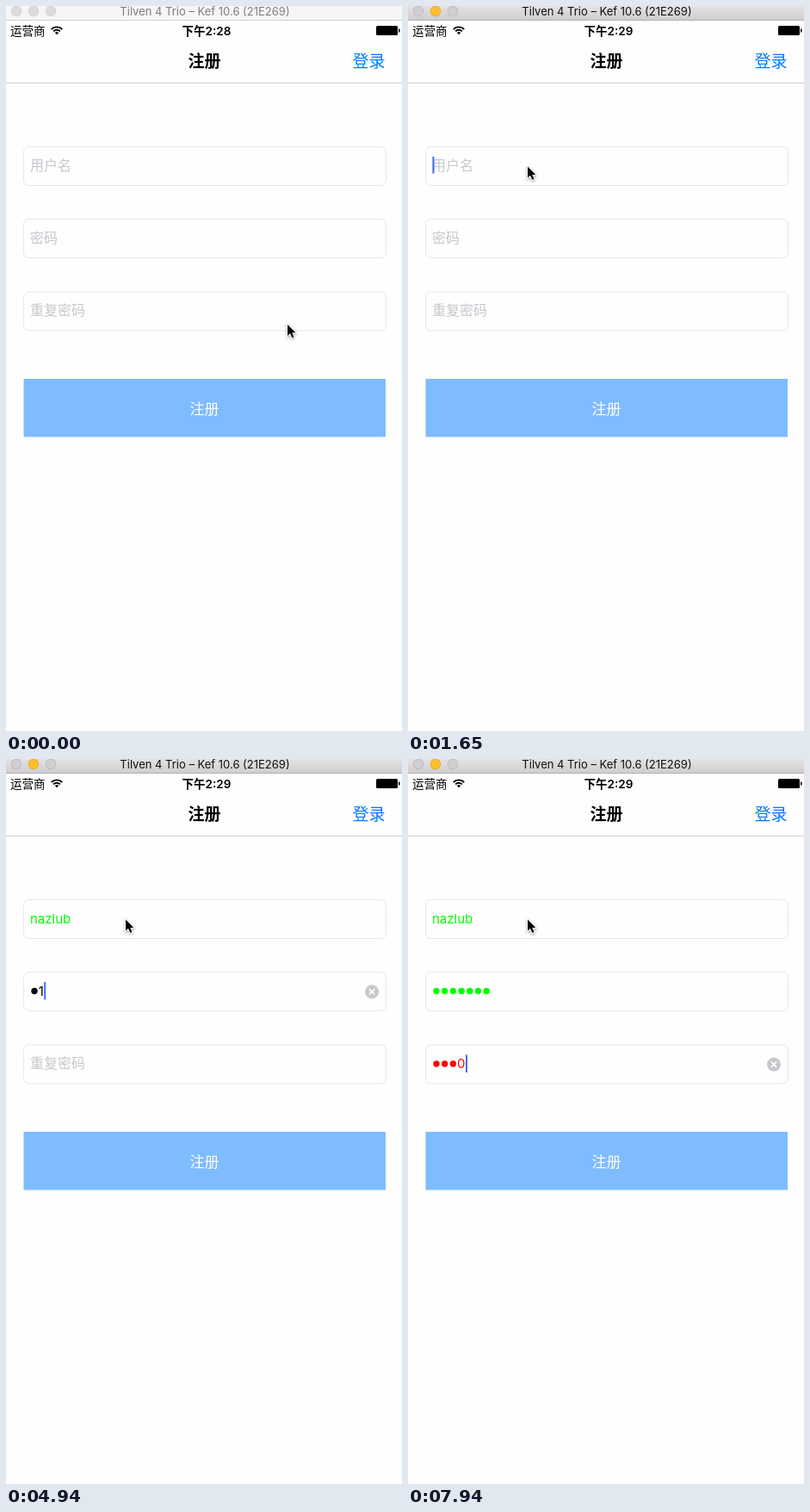
Recreate the animation shown at these times as an HTML page with a canvas. Size 460x842 px, loop 8000 ms.

```html
<!DOCTYPE html>
<html lang="zh">
<head>
<meta charset="utf-8">
<title>注册</title>
<style>
  html, body { margin: 0; width: 460px; height: 842px; overflow: hidden; background: #fefefe; }
  canvas { display: block; }
</style>
</head>
<body>
<canvas id="stage" width="460" height="842"></canvas>
<script>
const ctx = document.getElementById('stage').getContext('2d');
const LOOP = 8000;
const FONT = 'Inter, "Noto Sans CJK SC", "Noto Sans CJK", sans-serif';
const GREEN = '#00ff00', RED = '#ff0000', BLACK = '#000';
const TEXT_X = 28, DOT_PITCH = 9.7;

// Pointer tip: [start time, x, y]
const POINTER = [
  [0, 326.5, 369.5], [150, 326, 367], [300, 323, 352], [450, 318.5, 330.5],
  [600, 296, 312], [750, 250, 290], [900, 185, 266], [1050, 141, 253],
  [1200, 141, 193], [1500, 138.5, 186]
];

const FIELDS = [
  { y: 163.5, hint: '用户名', value: 'nazlub', focus: 1650, blur: 3590,
    keys: [2090, 2540, 2690, 3140, 3290, 3440],
    color: n => n < 6 ? RED : GREEN },
  { y: 247.5, hint: '密码', value: '2140367', secret: true, focus: 3740, blur: 6590,
    keys: [4340, 4940, 5240, 5390, 5540, 5690, 5840], maskAt: 6440,
    color: n => n < 6 ? BLACK : GREEN },
  { y: 332, hint: '重复密码', value: '2140367', secret: true, focus: 6740, blur: LOOP,
    keys: [7190, 7490, 7790, 7940],
    color: () => RED }
];

function text(str, x, y, size, color, align = 'left', weight = 400) {
  ctx.font = `${weight} ${size}px ${FONT}`;
  ctx.textAlign = align;
  ctx.fillStyle = color;
  ctx.fillText(str, x, y);
  return ctx.measureText(str).width;
}

function rect(x, y, w, h, color) {
  ctx.fillStyle = color;
  ctx.fillRect(x, y, w, h);
}

function disc(x, y, r, color) {
  ctx.fillStyle = color;
  ctx.beginPath();
  ctx.arc(x, y, r, 0, Math.PI * 2);
  ctx.fill();
}

function titleBar(active) {
  const shade = ctx.createLinearGradient(0, 0, 0, 16);
  shade.addColorStop(0, active ? '#e4e2e4' : '#f6f6f6');
  shade.addColorStop(1, active ? '#cfcdcf' : '#f6f6f6');
  rect(0, 0, 460, 16, shade);
  rect(0, 16, 460, 1, active ? '#b3b1b3' : '#d1d1d1');
  [12, 32, 52].forEach((x, i) => {
    const yellow = active && i === 1;
    disc(x, 6, 6.2, yellow ? '#e0a52c' : active ? '#bab8ba' : '#d2d2d2');
    disc(x, 6, 5.5, yellow ? '#ffbf2f' : active ? '#d0ced0' : '#dcdcdc');
  });
  text('Tilven 4 Trio – Kef 10.6 (21E269)', 231, 11, 13, active ? '#111' : '#7f7f7f', 'center');
}

function wifi() {
  const x = 59, y = 33.2, a = Math.PI * 0.25;
  ctx.strokeStyle = BLACK;
  ctx.lineWidth = 1.9;
  for (const r of [5.4, 8.8]) {
    ctx.beginPath();
    ctx.arc(x, y, r, -Math.PI + a, -a);
    ctx.stroke();
  }
  ctx.fillStyle = BLACK;
  ctx.beginPath();
  ctx.moveTo(x, y);
  ctx.arc(x, y, 3, -Math.PI + a, -a);
  ctx.fill();
}

function statusBar(clock) {
  text('运营商', 5, 33.5, 13.5, BLACK);
  wifi();
  text(clock, 233, 33.5, 13.5, BLACK, 'center', 600);
  ctx.fillStyle = BLACK;
  ctx.beginPath();
  ctx.roundRect(430, 23, 25, 11, 1.5);
  ctx.fill();
  rect(456, 26.5, 1.5, 4, BLACK);
}

function navBar() {
  text('注册', 230.5, 71.3, 19, BLACK, 'center', 600);
  text('登录', 440.5, 71.3, 19, '#007aff', 'right');
  rect(0, 89, 460, 1, '#cfcfcf');
}

function clearButton(y) {
  disc(425, y, 8, '#c7c7cc');
  ctx.strokeStyle = '#fff';
  ctx.lineWidth = 1.7;
  ctx.beginPath();
  for (const d of [-3.2, 3.2]) {
    ctx.moveTo(425 - 3.2, y - d);
    ctx.lineTo(425 + 3.2, y + d);
  }
  ctx.stroke();
}

function field(f, t) {
  ctx.strokeStyle = '#e6e6e6';
  ctx.lineWidth = 1;
  ctx.beginPath();
  ctx.roundRect(20.5, f.y, 421, 45, 6);
  ctx.stroke();

  const count = f.keys.filter(k => t >= k).length;
  const focused = t >= f.focus && t < f.blur;
  const baseline = f.y + 27.3;
  let caretX = TEXT_X;

  if (!count) {
    text(f.hint, TEXT_X, baseline, 16, '#c7c7cd');
  } else {
    const color = f.color(count);
    const hidden = !f.secret ? 0 : t >= f.maskAt ? count : count - 1;
    for (let i = 0; i < hidden; i++) {
      disc(33 + i * DOT_PITCH, f.y + 22, 3.7, color);
    }
    caretX += hidden * DOT_PITCH;
    caretX += text(f.value.slice(hidden, count), caretX, baseline, 15, color);
    if (focused) clearButton(f.y + 22.8);
  }
  if (focused) rect(caretX + 0.4, f.y + 11.5, 2, count ? 20.5 : 19.5, '#426bf2');
}

function pointer(t) {
  const [, x, y] = POINTER.findLast(p => t >= p[0]);
  ctx.save();
  ctx.translate(x, y);
  ctx.beginPath();
  [[0.5, 0.5], [0.5, 13.5], [3.5, 10.8], [5.8, 15.8], [8, 14.9], [5.8, 9.9], [9.8, 9.7]]
    .forEach(p => ctx.lineTo(...p));
  ctx.closePath();
  ctx.shadowColor = 'rgba(0,0,0,.4)';
  ctx.shadowBlur = 3;
  ctx.shadowOffsetY = 1;
  ctx.strokeStyle = '#fff';
  ctx.lineWidth = 2;
  ctx.stroke();
  ctx.shadowColor = 'transparent';
  ctx.fillStyle = BLACK;
  ctx.fill();
  ctx.restore();
}

function draw(t) {
  rect(0, 0, 460, 842, '#fefefe');
  titleBar(t >= 150);
  statusBar(t < 1500 ? '下午2:28' : '下午2:29');
  navBar();
  FIELDS.forEach(f => field(f, t));
  rect(20.5, 433, 420.5, 67.5, '#7fbbff');
  text('注册', 230.5, 473.5, 17, '#fff', 'center');
  pointer(t);
}

const start = performance.now();
function tick() {
  draw((performance.now() - start) % LOOP);
  requestAnimationFrame(tick);
}
tick();
</script>
</body>
</html>
```
